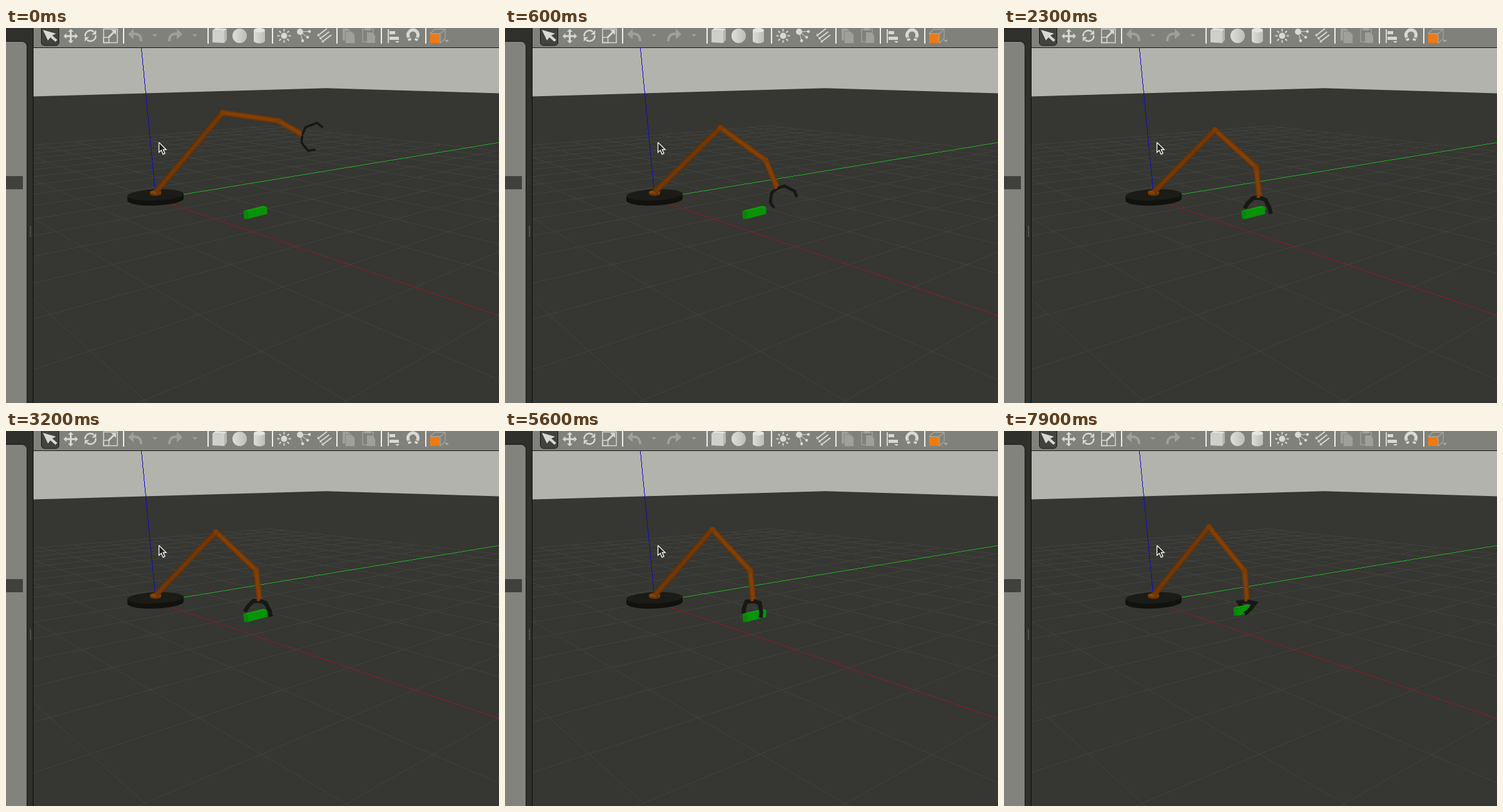
Animation, 788 px wide and 600 px high, one loop 8 s. Source, as an HTML page with a canvas:

```html
<!DOCTYPE html>
<html lang="en">
<head>
<meta charset="utf-8">
<title>Robot arm simulation</title>
<style>
html, body { margin: 0; width: 100%; height: 100%; overflow: hidden; background: #363632; }
canvas { display: block; }
</style>
</head>
<body>
<canvas id="stage" width="788" height="600"></canvas>
<script>
const stage = document.getElementById('stage');
const ctx = stage.getContext('2d');
const LOOP = 8000, STEP = 100, DEG = Math.PI / 180;

// Key poses: reach out, swing down, settle, draw in. "ease" shapes the way to the next one.
const poses = [
  { t: 0, ease: 1, elbow: [346, 135], wrist: [435, 148], hand: [473, 170], roll: [-75] },
  { t: 600, ease: 2, elbow: [344, 159], wrist: [416, 211], hand: [435, 256], roll: [-28] },
  { t: 1500, ease: 1, elbow: [338, 164], wrist: [405, 222], hand: [411, 271], roll: [11] },
  { t: 7900, ease: 1, elbow: [327, 153], wrist: [384, 223], hand: [388, 272], roll: [3] }
];

const ramp = (t, from, to) => Math.min(1, Math.max(0, (t - from) / (to - from)));

function poseAt(t) {
  const i = Math.max(0, poses.findLastIndex((p, n) => p.t <= t && n < poses.length - 1));
  const a = poses[i], b = poses[i + 1];
  const k = 1 - (1 - ramp(t, a.t, b.t)) ** a.ease;
  const mix = part => a[part].map((v, j) => v + (b[part][j] - v) * k);
  return { elbow: mix('elbow'), wrist: mix('wrist'), hand: mix('hand'), roll: mix('roll')[0] };
}

function trace(p) {
  ctx.beginPath();
  for (let i = 0; i < p.length; i += 2) ctx.lineTo(p[i], p[i + 1]);
}
function poly(color, ...p) {
  trace(p);
  ctx.closePath();
  ctx.fillStyle = color;
  ctx.fill();
}
function line(color, width, ...p) {
  trace(p);
  ctx.strokeStyle = color;
  ctx.lineWidth = width;
  ctx.stroke();
}
function rect(color, x, y, w, h) {
  ctx.fillStyle = color;
  ctx.fillRect(x, y, w, h);
}
function ellipse(color, x, y, rx, ry = rx, turn = 0) {
  ctx.beginPath();
  ctx.ellipse(x, y, rx, ry, turn, 0, Math.PI * 2);
  ctx.fillStyle = color;
  ctx.fill();
}
function arc(color, width, x, y, r, from, to) {
  ctx.beginPath();
  ctx.arc(x, y, r, from, to);
  ctx.strokeStyle = color;
  ctx.lineWidth = width;
  ctx.stroke();
}
function roundBox(fill, stroke, x, y, w, h, r) {
  ctx.beginPath();
  ctx.roundRect(x, y, w, h, r);
  ctx.fillStyle = fill;
  ctx.fill();
  ctx.strokeStyle = stroke;
  ctx.lineWidth = 1;
  ctx.stroke();
}
function shade(x0, x1, from, to) {
  const g = ctx.createLinearGradient(x0, 0, x1, 0);
  g.addColorStop(0, from);
  g.addColorStop(1, to);
  return g;
}

// Hard-edged line, one pixel wide
function pixelLine(color, x0, y0, x1, y1) {
  const n = Math.ceil(Math.max(Math.abs(x1 - x0), Math.abs(y1 - y0)));
  for (let i = 0; i <= n; i++)
    rect(color, Math.round(x0 + (x1 - x0) * i / n), Math.round(y0 + (y1 - y0) * i / n), 1, 1);
}

// Ground plane in perspective: u runs away along red, v along green
const DU = 0.0683, DV = 0.0679;
function project(u, v) {
  const a = u * DU, b = v * DV, w = 1 + a + b;
  return [(239 - 357.5 * a + 1474 * b) / w, (273 + 70 * (a + b)) / w];
}
function gridLine(point, rate, other) {
  const start = Math.max(-10, (0.08 - other) / rate);
  pixelLine('#41413d', ...point(start), ...point(10));
}

function drawWorld() {
  rect('#b2b3ad', 44, 32, 744, 80);
  poly('#363632', 44, 109.5, 512, 96.3, 788, 104.5, 788, 600, 44, 600);
  for (let i = -10; i <= 10; i++) {
    gridLine(s => project(i, s), DV, 1 + i * DU);
    gridLine(s => project(s, i), DU, 1 + i * DV);
  }
  pixelLine('#911824', 239, 273, 788, 460);
  pixelLine('#23ab23', 239, 273, 788, 182.7);
  pixelLine('#0c0cc0', 216, 32, 238, 262);

  ellipse('#11110e', 239, 274.5, 45, 9.5, -0.04);
  poly('#11110e', 194, 269, 284, 265, 284, 273, 194, 276);
  ellipse('#1b1b17', 239, 267, 45, 9, -0.04);
  ellipse('#6b3406', 239, 265.5, 9, 3);
  rect('#6b3406', 230, 262.5, 18, 3);
  ellipse('#894308', 239, 262.5, 9, 3);
}

function tube(color, edge, a, b) {
  line(edge, 9, ...a, ...b);
  line(color, 5, ...a, ...b);
}

// side is -1 for the left finger, 1 for the right one
function drawFinger(t, { hand, roll }, side) {
  const close = ramp(t, 4600, 7900), early = 1 - ramp(t, 0, 1500);
  const open = 36 - 71 * close, fold = 15 + 45 * early;
  const size = 1 + 0.3 * early;
  const points = [...hand];
  let [x, y] = hand;
  const step = (length, out) => {
    const a = (90 + roll - side * out) * DEG;
    x += Math.cos(a) * length * size;
    y += Math.sin(a) * length * size;
    points.push(x, y);
  };
  step(10 + 3 * close, 80);
  step(side < 0 ? 13 - 6 * close : 15, open);
  step(9, open - fold);
  line('#171714', 6.5 - 3 * early, ...points);
}

function drawBlock(t) {
  const slide = ramp(t, 6000, 6600), lift = ramp(t, 6600, 7900);
  const x = 386 - 11 * slide - 2 * lift, y = 293 - 2 * slide - 8 * lift;
  const w = 31 - 9 * lift, rise = 7 - 3 * lift, h = 12;
  poly('#068806', x - 7, y - 1, x, y, x, y + h, x - 6, y + h);
  poly('#089308', x, y, x + w, y - rise, x + w, y + h - rise - 1, x, y + h);
  poly('#07a307', x - 7, y - 1, x + w - 6, y - rise - 2, x + w, y - rise, x, y);
}

function drawArm(t) {
  const pose = poseAt(t);
  const { elbow, wrist, hand } = pose;
  ctx.save();
  ctx.translate(0.5, 0.5);
  drawFinger(t, pose, -1);
  tube('#82400a', '#713706', wrist, hand);
  tube('#824007', '#6f3505', elbow, wrist);
  tube('#733806', '#653105', [239, 262], elbow);
  ellipse('#7a3c07', ...elbow, 4.5);
  ellipse('#7a3b06', ...wrist, 4.4);
  drawBlock(t);
  drawFinger(t, pose, 1);
  ctx.restore();
}

function drawPanel() {
  rect('#2f2f2b', 0, 0, 44, 600);
  roundBox('#82837c', '#151512', -10.5, 21.5, 44, 600, 8);
  rect('#40413c', 0, 237, 27, 21);
  rect('#0c0c0a', 43, 0, 1, 600);
  for (let y = 317; y < 335; y += 3) {
    rect('#8b8b85', 38, y, 1, 1);
    rect('#8b8b85', 39, y + 1, 1, 1);
  }
}

function arrowHead(color, x, y, dx, dy, size) {
  poly(color, x + dx * size, y + dy * size,
    x - dy * size, y + dx * size, x + dy * size, y - dx * size);
}

function drawToolbar() {
  const light = '#d8d8d4', dim = '#a0a09b', bar = '#80817b';
  rect(bar, 44, 0, 744, 31);
  rect('#161614', 44, 31, 744, 1);
  for (const x of [187, 322, 425, 528, 599, 670]) rect('#f0f0ee', x, 0, 2, 25);

  roundBox('#42433e', '#181816', 56.5, -8, 28, 36, 5);
  poly(light, 59, 3, 80, 9, 74, 12, 82, 19, 79, 22, 71, 15, 67, 20);

  // move, rotate, scale
  for (let i = 0; i < 4; i++) {
    const dx = Math.round(Math.cos(i * 90 * DEG)), dy = Math.round(Math.sin(i * 90 * DEG));
    line(light, 3, 103.5, 13, 103.5 + dx * 8, 13 + dy * 8);
    arrowHead(light, 103.5 + dx * 7, 13 + dy * 7, dx, dy, 4.5);
  }
  for (const turn of [0, 180]) {
    arc(light, 2.5, 135, 12.5, 8.5, (turn + 175) * DEG, (turn + 310) * DEG);
    const a = (turn + 315) * DEG;
    arrowHead(light, 135 + Math.cos(a) * 8, 12.5 + Math.sin(a) * 8, -Math.sin(a), Math.cos(a), 5);
  }
  ctx.strokeStyle = light;
  ctx.lineWidth = 1.5;
  ctx.strokeRect(156, 1.5, 22, 22);
  ctx.strokeRect(156, 15, 8.5, 8.5);
  line(light, 3, 164, 15, 173, 6);
  poly(light, 176, 3, 176, 11, 168, 3);

  // undo, redo
  for (const [x, s] of [[195, 1], [282, -1]]) {
    poly(dim, x, 10, x + s * 9, 1, x + s * 9, 18);
    ctx.beginPath();
    ctx.moveTo(x + s * 8, 9.5);
    ctx.quadraticCurveTo(x + s * 21, 8, x + s * 21, 21);
    ctx.strokeStyle = dim;
    ctx.lineWidth = 4;
    ctx.stroke();
  }
  for (const x of [238, 302]) poly(dim, x - 4, 10, x + 4, 10, x, 14);

  // box, sphere, cylinder
  poly('#dededb', 330, 4, 335, 0, 353, 1, 349, 5);
  poly('#cfcfcb', 330, 4, 349, 5, 349, 24, 330, 23);
  poly('#b7b7b2', 349, 5, 353, 1, 353, 19, 349, 24);
  ellipse(shade(362, 385, '#dededb', '#bdbdb8'), 373.5, 12.5, 11.5);
  const metal = shade(396, 414, '#dcdcd8', '#bdbdb8');
  ellipse(metal, 405, 20.5, 9, 4);
  rect(metal, 396, 4, 18, 17);
  ellipse('#e4e4e1', 405, 3.5, 9, 3.5);

  // point, spot and directional lights
  ellipse(light, 444.5, 12.5, 5);
  for (let i = 0; i < 8; i++) {
    const c = Math.cos(i * 45 * DEG), s = Math.sin(i * 45 * DEG);
    line(light, 2, 444.5 + c * 7, 12.5 + s * 7, 444.5 + c * 11, 12.5 + s * 11);
  }
  ellipse(light, 470, 6, 5);
  for (let i = 0; i < 3; i++) {
    const a = (i * 38 - 2) * DEG, c = Math.cos(a), s = Math.sin(a);
    line(light, 1, 470, 6, 470 + c * 15, 6 + s * 15);
    ellipse(light, 470 + c * 15, 6 + s * 15, 2.3);
    const x = 513 + i * 3.5, y = 1 + i * 5;
    line(light, 2, x, y, x - 13, y + 10);
    arrowHead(light, x - 13, y + 10, -0.8, 0.6, 3);
  }

  // copy, paste
  const sheet = (color, x, y, w, h) =>
    poly(color, x, y, x + w - 5, y, x + w, y + 5, x + w, y + h, x, y + h);
  sheet(dim, 538, 1, 14, 19);
  sheet('#888983', 542, 5, 16, 20);
  sheet(dim, 543, 6, 14, 18);
  ctx.strokeStyle = dim;
  ctx.lineWidth = 1.5;
  ctx.strokeRect(570, 2, 17, 20);
  rect(dim, 574, 0, 9, 4);
  sheet(dim, 577, 7, 13, 17);

  // align, snap, view
  rect(light, 610, 2, 2, 22);
  rect(light, 613, 5, 9, 5);
  rect(light, 613, 14, 15, 5);
  poly(light, 622, 21, 629, 21, 625.5, 24);
  arc(light, 5, 650.5, 11, 8, 158 * DEG, 382 * DEG);
  for (const s of [-1, 1]) {
    line(light, 5, 650.5 + s * 7.5, 14, 650.5 + s * 4.5, 20);
    line(bar, 1.5, 650.5 + s * 9.5, 17, 650.5 + s * 2.5, 15);
  }
  rect('#ee7a14', 678, 9, 16, 15);
  line('#a5a5a0', 1.3, 678, 9, 685, 2, 702, 2, 702, 17, 694, 24);
  line('#a5a5a0', 1.3, 678, 9, 694, 9, 702, 2);
  line('#a5a5a0', 1.3, 694, 9, 694, 24);
  poly('#aaaaa5', 701, 19, 708, 19, 704.5, 23);
}

function drawPointer() {
  const p = [244.5, 183, 244.5, 199, 248.3, 195.6, 251, 202, 254, 200.7, 251.3, 194.5, 256, 194.5];
  poly('#20201d', ...p);
  line('#f4f4f4', 1.4, ...p, p[0], p[1]);
}

// The scenery never changes, so it is painted once
drawWorld();
drawPanel();
drawToolbar();
const backdrop = document.createElement('canvas');
backdrop.width = stage.width;
backdrop.height = stage.height;
backdrop.getContext('2d').drawImage(stage, 0, 0);

function frame(now) {
  const t = Math.floor(now % LOOP / STEP) * STEP;
  ctx.drawImage(backdrop, 0, 0);
  drawArm(t);
  drawPointer();
  requestAnimationFrame(frame);
}
requestAnimationFrame(frame);
</script>
</body>
</html>
```
